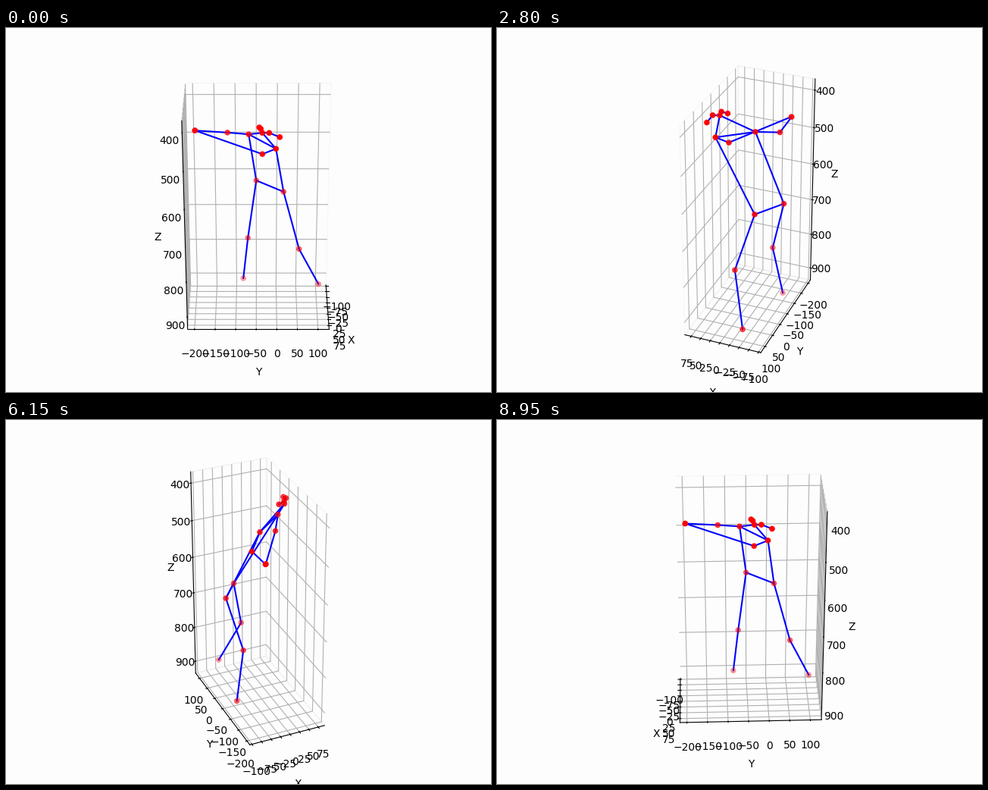
Recreate the animation shown at these times as a matplotlib script. Size 640 by 480 pixels, loop 9000 ms.

```python
import numpy as np
import matplotlib.pyplot as plt
from matplotlib.animation import FuncAnimation

FRAMES = 180
PAPER = "#fdfdfd"

# Body joints as (x, y, z); z grows downwards
JOINTS = {
    "nose": (63.9, -35.9, 415.0),
    "eye_r": (61.1, -39.4, 406.4),
    "eye_l": (75.0, -20.4, 409.4),
    "ear_r": (46.6, -42.8, 409.9),
    "ear_l": (79.4, 3.6, 417.9),
    "shoulder_r": (-13.0, -67.5, 458.2),
    "shoulder_l": (61.8, -4.6, 456.9),
    "elbow_r": (-55.2, -117.9, 475.3),
    "elbow_l": (41.3, -35.7, 481.6),
    "wrist_r": (-55.8, -195.0, 470.2),
    "wrist_l": (-55.0, -194.4, 469.8),
    "hip_r": (-92.9, -50.0, 625.4),
    "hip_l": (-44.7, 15.7, 629.8),
    "knee_r": (-57.7, -70.6, 767.1),
    "knee_l": (-9.6, 54.1, 769.7),
    "ankle_r": (-80.9, -82.7, 899.8),
    "ankle_l": (-50.0, 105.1, 897.2),
}
LIMB_CHAINS = [
    ("nose", "eye", "ear"),
    ("nose", "shoulder", "elbow", "wrist"),
    ("shoulder", "hip", "knee", "ankle"),
]


def joint(name, side):
    return JOINTS[name] if name == "nose" else JOINTS[f"{name}_{side}"]


def bones():
    for side in "rl":
        for chain in LIMB_CHAINS:
            for a, b in zip(chain, chain[1:]):
                yield joint(a, side), joint(b, side)
    for name in ("shoulder", "hip"):
        yield joint(name, "r"), joint(name, "l")


fig = plt.figure(figsize=(6.4, 4.8), dpi=100, facecolor=PAPER)
ax = fig.add_subplot(projection="3d", facecolor=PAPER)

points = np.array(list(JOINTS.values()))
for a, b in bones():
    ax.plot(*zip(a, b), color="b")
ax.scatter(*points.T, c="r", marker="o")

# 5 % data margin, then 1/48 view margin on each side
low, high = points.min(axis=0), points.max(axis=0)
pad = (high - low) * (0.05 + 1.1 / 48)
low, high = low - pad, high + pad
ax.set_xlim(low[0], high[0])
ax.set_ylim(low[1], high[1])
ax.set_zlim(high[2], low[2])
ax.set_box_aspect(high - low)

ax.set_xlabel("X")
ax.set_ylabel("Y")
ax.set_zlabel("Z")
for axis in (ax.xaxis, ax.yaxis, ax.zaxis):
    axis.pane.set_fill(False)


def update(i):
    ax.view_init(elev=30, azim=i * 360 / FRAMES)
    return []


anim = FuncAnimation(fig, update, frames=FRAMES, interval=50,
                     init_func=lambda: update(0), repeat=True,
                     repeat_delay=0)
plt.show()
```
